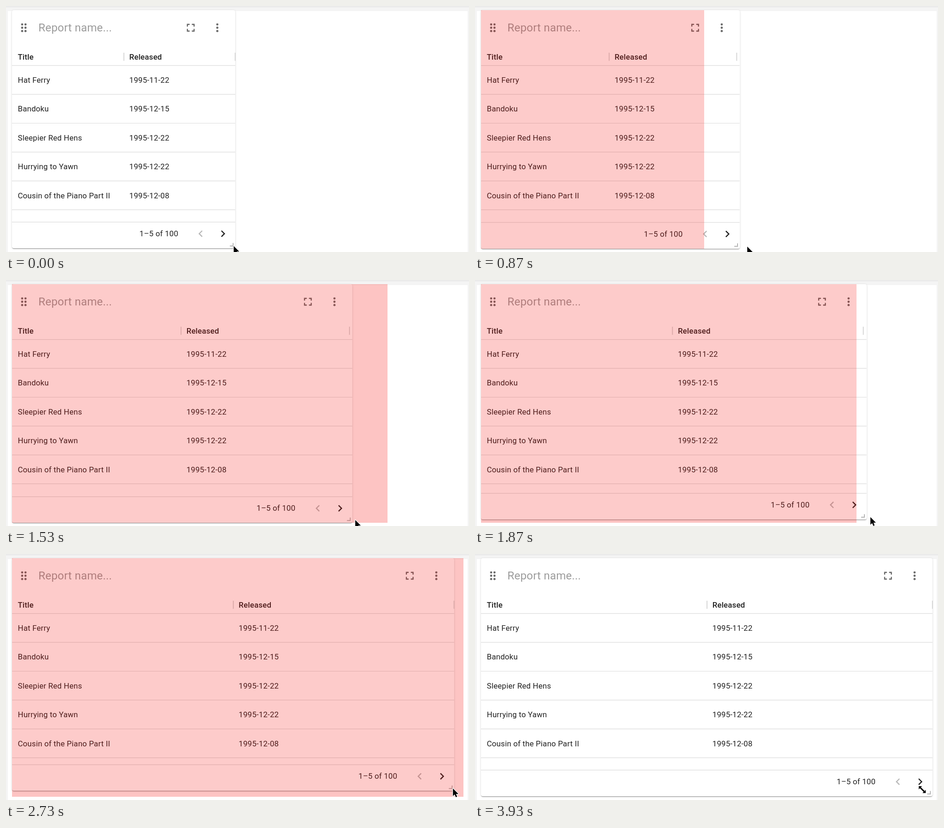
An HTML page for the animation above (3.99 s loop, 1000 px wide and 532 px high).

```html
<!DOCTYPE html>
<html lang="en">
<head>
<meta charset="utf-8">
<title>Resizing a report card</title>
<style>
  html, body { margin: 0; width: 100%; height: 100%; overflow: hidden; background: #f4f4f4; }
  div, svg { position: absolute; }
  #bar { width: 1000px; height: 3px; background: #ebebeb; }
  #panel { left: 4px; top: 11px; width: 993px; height: 521px; background: #fff; }
  #card {
    left: 13px; top: 9px; background: #fff; border-radius: 4px;
    box-shadow: 0 2px 1px -1px rgba(0,0,0,.26), 0 1px 1px rgba(0,0,0,.17), 0 1px 4px rgba(0,0,0,.15);
  }
  .drop { left: 13px; top: 9px; height: 515.5px; background: rgb(245,10,5); }
  #under { opacity: .035; }
  #over { opacity: .21; }
  svg { left: 0; top: 0; width: 1000px; height: 532px; }
  text { font: 16.8px Roboto, sans-serif; letter-spacing: .18px; fill: #212121; }
  .head { font-weight: 500; }
  .name { font-size: 24px; fill: #9c9c9c; }
  .line { stroke: #dcdcdc; stroke-width: 1.2; }
  .split { fill: #d6d6d6; }
  .icon { fill: #6b6b6b; }
  .stroke { fill: none; stroke: #666; stroke-width: 2.4; }
  .cursor { stroke: #fff; stroke-width: 2.4; paint-order: stroke; stroke-linejoin: round; }
</style>
</head>
<body>
<div id="bar"></div>
<div id="panel"></div>
<div id="under" class="drop"></div>
<div id="card"></div>
<svg>
  <text class="name" x="70" y="55">Report name...</text>
  <text class="head" x="25.5" y="115.5">Title</text>
  <g id="rows"></g>
  <g id="column">
    <rect class="split" x="-.4" y="101" width="2" height="17.5"/>
    <text class="head" x="12.3" y="115.5">Released</text>
  </g>
  <rect id="edge" class="split" y="101" width="2" height="17.5"/>
  <g id="grip" class="icon"></g>
  <g id="tools">
    <g id="more" class="icon"></g>
    <path class="stroke" d="M-103.2 44.6v-4.8h4.8m4.8 0h4.8v4.8m0 4.8v4.8h-4.8m-4.8 0h-4.8v-4.8"/>
  </g>
  <g id="footer">
    <text x="-123" y="-26" text-anchor="end">1–5 of 100</text>
    <path class="stroke" style="stroke:#b8b8b8" d="M-71.3-38l-6.4 6.4 6.4 6.4"/>
    <path class="stroke" style="stroke:#212121" d="M-29.7-38l6.4 6.4-6.4 6.4"/>
    <path class="stroke" style="stroke:#b4b4b4;stroke-width:2" d="M-11.5-5h7v-6.5"/>
  </g>
  <line id="rule" class="line" x1="13"/>
</svg>
<div id="over" class="drop"></div>
<svg>
  <g id="cursor" class="cursor">
    <path id="arrow" d="M-.2-1V15.5l3.7-3.5 2.6 6 2.8-1.2-2.5-5.8h5.2z"/>
    <path id="resize" d="M-7.5-7.5h7l-2.4 2.4 8 8 2.4-2.4v7h-7l2.4-2.4-8-8-2.4 2.4z"/>
  </g>
</svg>
<script>
const LOOP = 3990, TICK = 1000 / 15, LEFT = 13, TOP = 9, GRID = 164.33;
const START = 8, RELEASE = 45;
const $ = id => document.getElementById(id);

const movies = [
  ['Hat Ferry', '1995-11-22'],
  ['Bandoku', '1995-12-15'],
  ['Sleepier Red Hens', '1995-12-22'],
  ['Hurrying to Yawn', '1995-12-22'],
  ['Cousin of the Piano Part II', '1995-12-08'],
];

// Keys are [tick, value, ...], with ticks of 1/15 s.
const rightKeys = [[8, 495], [9, 500], [17, 643], [23, 748], [31, 904], [32, 922],
  [36, 958], [40, 967], [41, 968], [44, 968], [45, 975], [46, 984], [47, 988]];
const bottomKeys = [[9, 524], [17, 525.3], [23, 525.3], [30, 515], [32, 513.3],
  [41, 512.3], [44, 512.3], [47, 524]];
const pointerKeys = [[3, 492, 520], [4, 494, 520], [7, 494, 520], [8, 507, 520],
  [9, 525.5, 520.5], [17, 651, 522], [23, 754.5, 520], [31, 914, 510],
  [32, 932, 507.5], [36, 958, 508], [41, 965.5, 508], [45, 966, 509.5]];

function at(keys, tick, field = 1) {
  const next = keys.findIndex(key => key[0] > tick);
  if (next === 0) return keys[0][field];
  if (next < 0) return keys[keys.length - 1][field];
  const a = keys[next - 1], b = keys[next];
  return a[field] + (b[field] - a[field]) * (tick - a[0]) / (b[0] - a[0]);
}

const dots = x => [39.8, 47, 54.2].map(y => `<circle cx="${x}" cy="${y}" r="2.4"/>`).join('');
$('grip').innerHTML = dots(34.9) + dots(42.1);
$('more').innerHTML = dots(-38.6);

for (let i = 0; i <= movies.length; i++) {
  const y = 128.7 + i * 62.4;
  $('rows').innerHTML += `<line class="line" x1="${LEFT}" y1="${y}" y2="${y}"/>`;
  if (!movies[i]) continue;
  const [title, date] = movies[i];
  $('rows').innerHTML += `<text x="25.5" y="${y + 37.3}">${title}</text>`;
  $('column').innerHTML += `<text x="12.3" y="${y + 37.3}">${date}</text>`;
}
const lines = document.querySelectorAll('.line');

const move = (id, x, y = 0) => $(id).setAttribute('transform', `translate(${x} ${y})`);
const show = (id, on) => { $(id).style.display = on ? '' : 'none'; };

function draw(now) {
  const tick = Math.floor((now % LOOP + 4) / TICK);
  const right = at(rightKeys, tick), bottom = at(bottomKeys, tick);
  const tableWidth = at(rightKeys, tick - .35) - LEFT; // columns trail the card

  $('card').style.width = right - LEFT + 'px';
  $('card').style.height = bottom - TOP + 'px';
  lines.forEach(line => line.setAttribute('x2', right));
  $('rule').setAttribute('y1', bottom - 56.6);
  $('rule').setAttribute('y2', bottom - 56.6);
  $('edge').setAttribute('x', LEFT + tableWidth - 1);
  move('column', LEFT + tableWidth / 2);
  move('tools', right);
  move('footer', right, bottom);

  const snapped = 495 + GRID * Math.round((right - 495) / GRID);
  for (const id of ['under', 'over']) {
    show(id, tick >= START && tick < RELEASE);
    $(id).style.width = snapped - LEFT + 'px';
  }

  const resizing = tick >= RELEASE || tick >= START && tick < 11;
  show('resize', resizing);
  show('arrow', !resizing);
  move('cursor', at(pointerKeys, tick), at(pointerKeys, tick, 2));
}

const begin = performance.now();
(function frame() {
  draw(performance.now() - begin);
  requestAnimationFrame(frame);
})();
</script>
</body>
</html>
```
